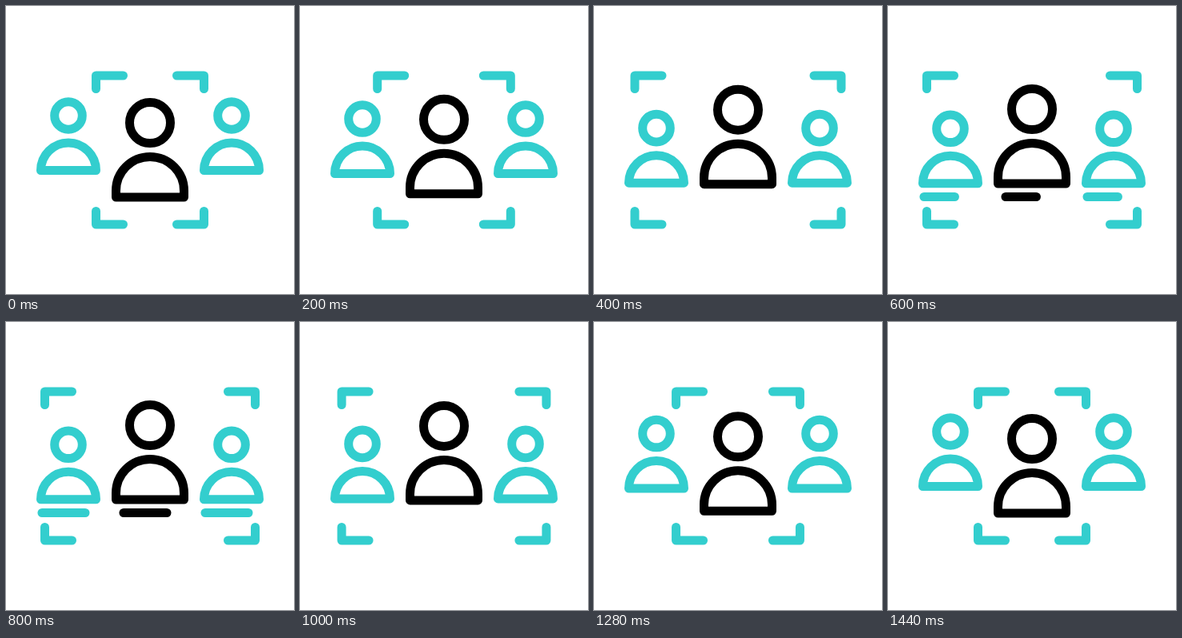
Animation of 360x360 px, one loop 1.48 s. Source, as an HTML page with a canvas:

```html
<!DOCTYPE html>
<html lang="en">
<head>
<meta charset="utf-8">
<title>People focus</title>
<style>
html, body { margin: 0; width: 100%; height: 100%; overflow: hidden; background: #fff; }
canvas { display: block; width: 360px; height: 360px; }
</style>
</head>
<body>
<canvas id="stage"></canvas>
<script>
const LOOP = 1480, STEP = 40;
const CYAN = '#33cece', BLACK = '#000';
const canvas = document.getElementById('stage');
const ctx = canvas.getContext('2d');
const ratio = window.devicePixelRatio || 1;
canvas.width = canvas.height = 360 * ratio;

// Cubic bezier easing (0.167, 0, 0.667, 1), solved by bisection.
function ease(x) {
  if (x <= 0) return 0;
  if (x >= 1) return 1;
  let lo = 0, hi = 1, s = 0.5;
  for (let i = 0; i < 24; i++) {
    const r = 1 - s;
    const at = 0.5 * s * r * r + 2 * s * s * r + s * s * s;
    if (at < x) lo = s; else hi = s;
    s = (lo + hi) / 2;
  }
  return s * s * (3 - 2 * s);
}

const ramp = (t, from, to) => ease((t - from) / (to - from));
const mix = (a, b, p) => a + (b - a) * p;

function stroke(color, trace) {
  ctx.beginPath();
  trace();
  ctx.strokeStyle = color;
  ctx.stroke();
}

function person(color, x, headY, headR, baseY, bodyR, domeY) {
  stroke(color, () => ctx.arc(x, headY, headR, 0, Math.PI * 2));
  stroke(color, () => {
    ctx.moveTo(x - bodyR, baseY);
    ctx.arc(x, domeY, bodyR, Math.PI, 0);
    ctx.lineTo(x + bodyR, baseY);
    ctx.closePath();
  });
}

function corner(sx, sy, halfWidth) {
  const x = 180 + sx * halfWidth, y = 180 + sy * 93;
  stroke(CYAN, () => {
    ctx.moveTo(x, y - sy * 16.5);
    ctx.lineTo(x, y);
    ctx.lineTo(x - sx * 34, y);
  });
}

function label(color, x, amount) {
  if (amount <= 0) return;
  stroke(color, () => {
    ctx.moveTo(x - 33, 238.5);
    ctx.lineTo(x - 33 + 66 * amount, 238.5);
  });
}

function draw(t) {
  const open = ramp(t, 120, 440) - ramp(t, 960, 1400);
  const written = ramp(t, 440, 760) - ramp(t, 760, 960);

  ctx.setTransform(ratio, 0, 0, ratio, 0, 0);
  ctx.fillStyle = '#fff';
  ctx.fillRect(0, 0, 360, 360);
  ctx.lineWidth = 11;
  ctx.lineCap = ctx.lineJoin = 'round';

  const halfWidth = mix(67.5, 131.5, open);
  for (const sx of [-1, 1]) {
    for (const sy of [-1, 1]) corner(sx, sy, halfWidth);
  }

  const sideDrop = 16.3 * open;
  for (const x of [78, 282]) {
    person(CYAN, x, 137 + sideDrop, 17.3, 205.5 + sideDrop, 34.5, 205.5 + sideDrop);
    label(CYAN, x, written);
  }

  const rise = 17 * open;
  person(BLACK, 180, 146 - rise, 25.5, 239 - rise, 42.5, 231 - rise);
  label(BLACK, 180, written);
}

function tick() {
  const t = performance.now() % LOOP;
  draw(Math.floor(t / STEP) * STEP);
  requestAnimationFrame(tick);
}
tick();
</script>
</body>
</html>
```
